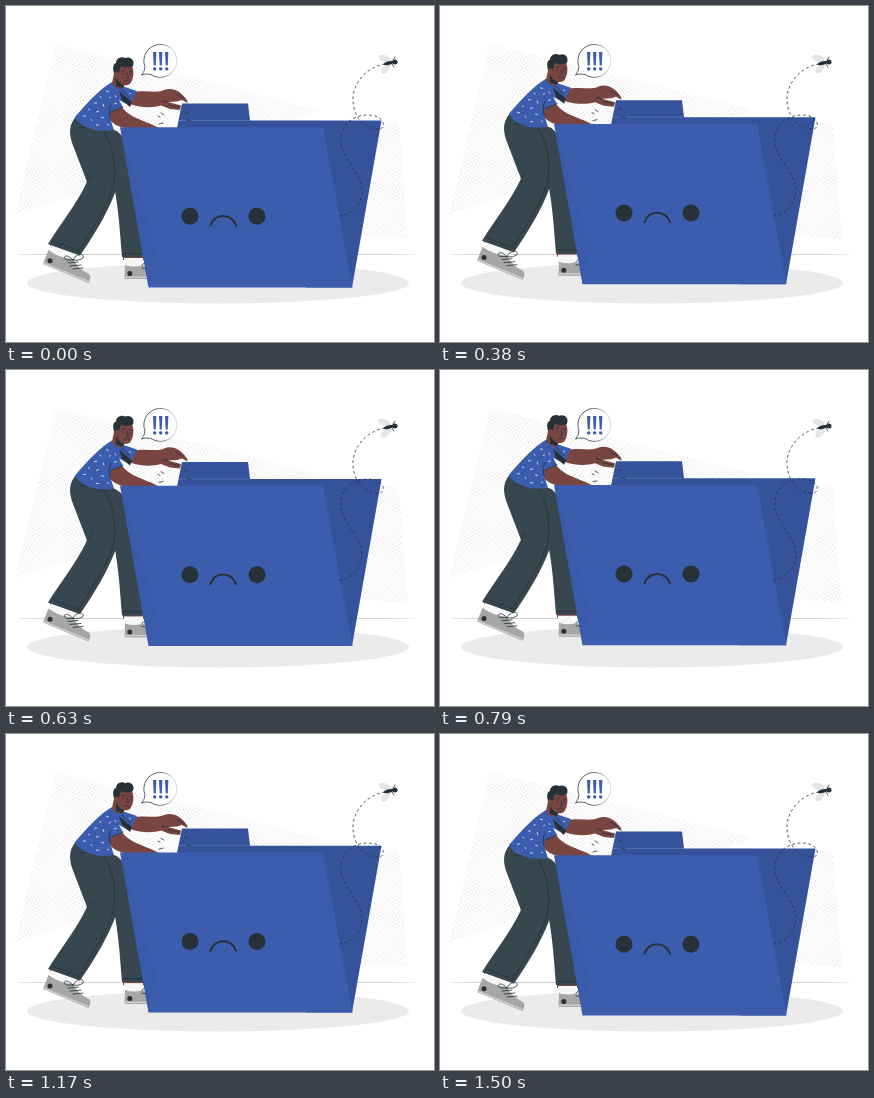
These frames come from a looping animation (428x336 px, 1540 ms). An HTML page:

```html
<!DOCTYPE html>
<html lang="en">
<head>
<meta charset="utf-8">
<title>Pushing a folder</title>
<style>
html, body { margin: 0; width: 100%; height: 100%; overflow: hidden; background: #fff; }
svg { display: block; width: 428px; height: 336px; }
.skin { fill: #794540; }
.dark { fill: #263238; }
.blue { fill: #3c5cae; }
.pants { fill: #37474f; }
.shoe { fill: #a6a6a6; }
.line { fill: none; stroke: #263238; stroke-width: .8; stroke-linecap: round; stroke-linejoin: round; }
</style>
</head>
<body>
<svg viewBox="0 0 428 336">
  <defs>
    <pattern id="dots" width="4.2" height="4.2" patternUnits="userSpaceOnUse" patternTransform="rotate(14)">
      <circle cx="1" cy="1" r=".58" fill="#d3d3d3"/>
      <circle cx="3.1" cy="3.1" r=".58" fill="#d3d3d3"/>
    </pattern>
    <linearGradient id="floor" gradientUnits="userSpaceOnUse" x1="12" x2="410">
      <stop stop-color="#e4e4e4"/><stop offset=".1" stop-color="#bdbdbd"/>
      <stop offset=".92" stop-color="#c8c8c8"/><stop offset="1" stop-color="#eee"/>
    </linearGradient>
    <linearGradient id="rim">
      <stop offset=".4" stop-color="#455157"/><stop offset="1" stop-color="#d4d6d7"/>
    </linearGradient>
  </defs>

  <path d="M50 38 314 104 200 148 9 208ZM350 117H393L402 233 350 229Z" fill="url(#dots)"/>
  <path d="M12 248.5H410" stroke="url(#floor)" stroke-width=".8"/>
  <ellipse cx="212" cy="277" rx="191" ry="20.5" fill="#ebebeb"/>

  <g id="floating">
    <path d="M171 122 176 97.5H242L244 114.6H375.5L346 281.5H300Z" fill="#35529b"/>
    <path d="M173 114.5H243.5" stroke="#7289c4" stroke-width=".5"/>

    <!-- far leg and shoe -->
    <path class="skin" d="M117 249H138V254H117Z"/>
    <path d="M118 252H137V261H118Z" fill="#f7f7f7"/>
    <path class="shoe" d="M119 259Q128 262 137 259L146 267V273H118.500Z"/>
    <path d="M118.500 271.300H146" stroke="#dedede"/>
    <circle class="dark" cx="123.800" cy="267.500" r="2.500"/>
    <path class="line" d="M136 259Q139 255 143 257M136 262 143 263"/>
    <path class="pants" d="M98 122Q112 122 118 133C121 166 133 218 140 251H116C114 228 113 205 108 180Z"/>
    <path class="line" d="M108 140Q112 160 110 179M117 247.500H139" stroke-width=".6"/>

    <!-- near leg and shoe -->
    <path class="skin" d="M45 235 75 246 73 250 44 240Z"/>
    <path d="M45 239 73 249 70 257 43 246Z" fill="#f7f7f7"/>
    <path class="shoe" d="M42.500 244Q53 252 67 253Q72 263 83 268Q86 271 82.500 277L37 258Z"/>
    <path d="M37.500 257 82.500 275.500" stroke="#d8d8d8" stroke-width="1.100"/>
    <circle class="dark" cx="44" cy="254.800" r="2.500"/>
    <path class="line" d="M67 254C60 246 55 252 61 254L67 254C71 246 79 248 77 252Q73 255 67 254M62 257 72 256M64 260 75 259M67 263 77 262"/>
    <path class="pants" d="M69.500 111C62 120 63 130 68 142L81 176C70 199 55 217 42 238L74 249.500C90 227 107 197 111 180C114 158 111 136 106 122Z"/>
    <path class="line" d="M98 126C108 140 110 160 108 177C103 199 84 226 72 246M46 235 74 245.500M74 121 83 122M81 176 86 169" stroke-width=".6"/>

    <!-- arms -->
    <path class="skin" d="M126 87C138 83 151 88 158 84C166 81 174 84 181 94L181.500 97 176 94 171 95.500 162 96 175 99.500 174 104 164 103 155 99.500C146 102 136 102 124 98Z"/>
    <path class="line" d="M162 96 156 95M163 99 173 101M170 88 177 92" stroke="#592e2c" stroke-width=".6"/>
    <path class="skin" d="M104 106 116 101C121 109 132 113 145 118L153 122H119Q108 120 103 113Z"/>

    <!-- shirt -->
    <path class="blue" d="M106 76C95 82 81 97 69 111C74 122 92 127 108 124L104 112 105 106 117 101 113 94 124 100 131 85 116 80Z"/>
    <path class="dark" d="M113 85 126 96 124 101 116 94Z"/>
    <path class="line" d="M104 112Q102 104 105 99M105 106 117 101M115 83 124 92" stroke-width=".6"/>
    <path d="M100 85l3 1M94 90l1 2M103 92l2-1M88 97l3 0M97 98l1 3M82 103l2 1M90 106l3-1M77 110l3 0M85 113l1 2M95 111l3 1M90 119l3 0M101 118l2 1M109 89l1 2M108 98l3-1M123 87l2 1" stroke="#e3e8f5" stroke-width=".8"/>

    <!-- head -->
    <path class="skin" d="M109 63 106 77Q111 85 117 82L119 77Z"/>
    <path d="M110 72Q114 78 119 77L117 82 110 80Z" fill="#263238"/>
    <path class="skin" d="M109 64Q111 55 124 57C129 62 128 73 124 78Q118 82 112 75Z"/>
    <path class="dark" d="M109 70C106 62 107 58 110 57C110 52 116 50 119 52C125 50 129 54 127 60Q121 63 115 60L112 69 110 66Z"/>
    <circle class="skin" cx="110.500" cy="68" r="2.500"/>
    <path class="line" d="M116 65 119 64M123 65 126 66M117.500 67.500V68M124 68V68.500M121 67 122.500 71 120.500 71.500M118 75Q121 73 123 75" stroke-width=".7"/>

    <path class="line" d="M155 107 158 109M152 110 154 111M153 118 157 117M179 106 182 107M181 114 185 115" stroke-width=".7"/>

    <!-- folder front -->
    <path class="blue" d="M114 121.300H317L346.500 281.500H142.500Z"/>
    <path d="M114 121.300 150 245 142.500 281.500Z" fill="#35529b" opacity=".18"/>
    <circle class="dark" cx="184" cy="210.300" r="8.500"/>
    <circle class="dark" cx="251" cy="210.300" r="8.500"/>
    <path class="line" d="M204.500 219.500C209 207 225 207 230 219.500" stroke-width="2" style="stroke-width:2"/>
  </g>

  <!-- speech bubble -->
  <path d="M139 61A16.500 16.500 0 1 1 145 68.500Q140 67 135.500 69Q138.500 66 139 61Z" fill="#fff" stroke="url(#rim)" stroke-width=".9"/>
  <g class="blue">
    <path id="mark" d="M147 46H150.400L149.700 59.500H147.700ZM148.700 61.200A1.700 1.700 0 1 1 148.690 61.200Z"/>
    <use href="#mark" x="6"/><use href="#mark" x="12"/>
  </g>

  <!-- fly and its trail -->
  <path class="line" d="M379 58C360 61 346 78 347 95C348 113 360 124 374 123C381 120 377 109 362 109C344 109 333 122 335 138C338 155 356 168 356 185C355 200 345 209 333 210" stroke-dasharray="2.700 2.700" style="stroke-linecap:butt"/>
  <g fill="#e4e6e7" stroke="#c8cccf" stroke-width=".4">
    <ellipse cx="378.500" cy="52.500" rx="6" ry="2.800" transform="rotate(18 378.500 52.500)"/>
    <ellipse cx="380" cy="62.500" rx="5.500" ry="2.800" transform="rotate(-48 380 62.500)"/>
  </g>
  <ellipse class="dark" cx="383" cy="57" rx="5.500" ry="1.700" transform="rotate(-14 383 57)"/>
  <circle class="dark" cx="389" cy="56" r="2.500"/>
  <path class="line" d="M387 54 389 51M386 58 388 61"/>
</svg>
<script>
const LOOP = 1540, PERIOD = 1500, LIFT = 6.6;
const floating = document.getElementById("floating");

// Rises and falls at constant speed, then rests until the loop ends.
function draw(now) {
  const phase = Math.min((now % LOOP) / PERIOD, 1);
  const lift = LIFT * (1 - Math.abs(2 * phase - 1));
  floating.setAttribute("transform", `translate(0 ${-lift})`);
  requestAnimationFrame(draw);
}
draw(0);
</script>
</body>
</html>
```
